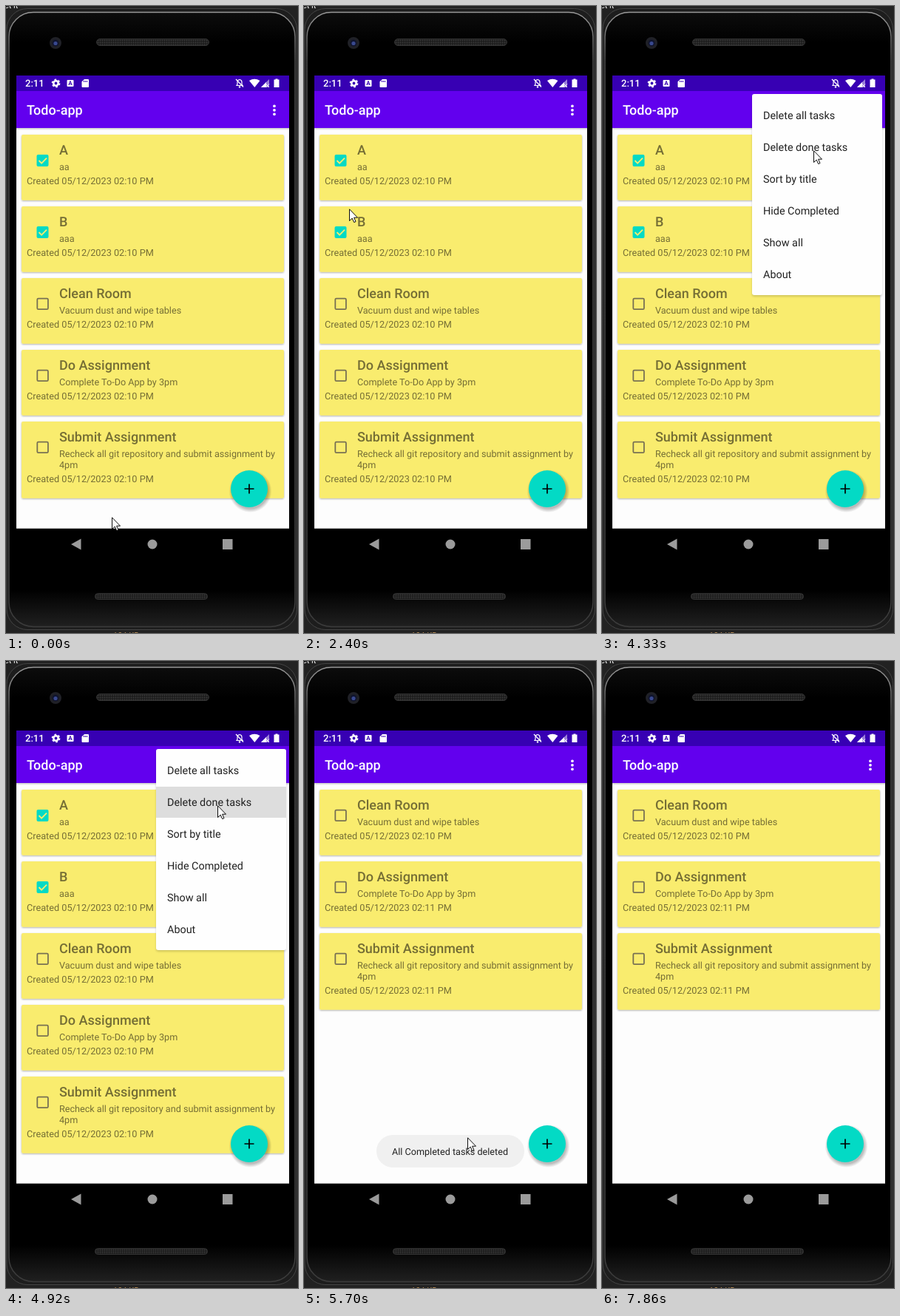
An HTML page that plays this animation: 395 by 848 pixels, repeating every 8.01 s.

```html
<!DOCTYPE html>
<html lang="en">
<head>
<meta charset="utf-8">
<title>Todo app demo</title>
<style>
html, body { margin: 0; width: 100%; height: 100%; overflow: hidden; background: #222; }
svg { display: block; width: 395px; height: 848px; font-family: Roboto, Arial, sans-serif; text-rendering: geometricPrecision; }
.title { font-size: 18px; font-weight: 500; }
.body { font-size: 12.63px; }
.stamp { font-size: 12.7px; }
.item { font-size: 14.4px; fill: #212121; }
</style>
</head>
<body>
<svg viewBox="0 0 395 848">
  <defs>
    <linearGradient id="rim" x1="0" y1="0" x2="0" y2="1">
      <stop offset="0" stop-color="#999"/><stop offset=".08" stop-color="#484848"/>
      <stop offset="1" stop-color="#3c3c3c"/>
    </linearGradient>
    <linearGradient id="glass" x1="0" y1="0" x2="0" y2="1">
      <stop offset="0" stop-color="#0c0c0c"/><stop offset=".05" stop-color="#000"/>
      <stop offset=".94" stop-color="#000"/><stop offset="1" stop-color="#202020"/>
    </linearGradient>
    <linearGradient id="barShade" x1="0" y1="0" x2="0" y2="1">
      <stop offset="0" stop-color="#c8c8c8"/><stop offset="1" stop-color="#fdfdfd"/>
    </linearGradient>
    <radialGradient id="fabShade">
      <stop offset=".82" stop-color="#000" stop-opacity=".26"/><stop offset="1" stop-color="#000" stop-opacity="0"/>
    </radialGradient>
    <pattern id="mesh" width="3" height="3" patternUnits="userSpaceOnUse">
      <rect width="3" height="3" fill="#1b1b1b"/><circle cx="1.5" cy="1.5" r="1" fill="#3a3a3a"/>
    </pattern>
    <clipPath id="menuClip"><rect id="menuClipBox"/></clipPath>
    <filter id="cardShade" x="-5%" y="-10%" width="110%" height="125%">
      <feDropShadow dx="0" dy="1" stdDeviation=".9" flood-opacity=".32"/>
    </filter>
    <filter id="blur" x="-10%" y="-10%" width="120%" height="120%"><feGaussianBlur stdDeviation="1.8"/></filter>
  </defs>

  <!-- Phone body -->
  <rect width="395" height="848" fill="#222"/>
  <text x="-2" y="3" font-size="11" fill="#eee">ct it</text>
  <rect x="1" y="3.5" width="392.5" height="840" rx="28" fill="#1d1d1d" stroke="#444"/>
  <rect x="4" y="8.5" width="387" height="831" rx="33" fill="url(#glass)" stroke="url(#rim)" stroke-width="1.5"/>
  <text x="145" y="855" font-size="11" fill="#c99a5b">104 KB</text>
  <g fill="url(#mesh)" stroke="#333">
    <rect x="122.5" y="44.5" width="152" height="9" rx="4.5"/>
    <rect x="120.5" y="794.5" width="152" height="8" rx="4"/>
  </g>
  <circle cx="67" cy="50" r="8" fill="#202127"/>
  <circle cx="67" cy="50" r="4.5" fill="#10142e"/>
  <circle cx="67" cy="50.5" r="2.6" fill="#39498f"/>

  <!-- Screen -->
  <rect x="14" y="94" width="369" height="612.7" fill="#fdfdfd"/>
  <rect x="14" y="94" width="369" height="21" fill="#3700b3"/>
  <rect x="14" y="115" width="369" height="50" fill="#6200ee"/>
  <rect x="14" y="165" width="369" height="3" fill="url(#barShade)"/>
  <g fill="#fff">
    <text x="26" y="109" font-size="13" font-weight="500">2:11</text>
    <circle cx="67.5" cy="104.5" r="3.2" fill="none" stroke="#fff" stroke-width="2.6"/>
    <circle cx="67.5" cy="104.5" r="5" fill="none" stroke="#fff" stroke-width="1.8" stroke-dasharray="2.6 2.636"/>
    <rect x="82.5" y="100" width="9" height="9" rx="1"/>
    <text x="87" y="107.4" font-size="8" font-weight="700" text-anchor="middle" fill="#3700b3">A</text>
    <path d="M106 99H111Q112 99 112 100V109Q112 110 111 110H103.5Q102.5 110 102.5 109V102.5Z"/>
    <path d="M105.5 101V103M107.5 101V103M109.5 101V103" stroke="#3700b3"/>
    <path d="M312 107.5H320L319 106V103Q319 100 316 99.5Q313 100 313 103V106Z" fill="none" stroke="#fff" stroke-width="1.2"/>
    <path d="M311 99L321 109.5" stroke="#fff" stroke-width="1.3"/>
    <circle cx="316" cy="109.5" r="1.2"/>
    <path d="M329 101Q336 96.5 343.5 101L336.3 110Z"/>
    <path d="M356 99V110H345Z" opacity=".5"/>
    <path d="M352 103V110H345Z"/>
    <path d="M351.5 105.5L356 110M356 105.5L351.5 110" stroke="#fff"/>
    <path d="M364.5 98.5H367.5V99.5H369.5V110H362.5V99.5H364.5Z"/>
    <text x="28" y="147.2" class="title">Todo-app</text>
    <path d="M363 135.3h0M363 140.8h0M363 146.3h0" stroke="#fff" stroke-width="3.8" stroke-linecap="round"/>
    <circle id="ripple" cx="362" cy="141.5" fill-opacity=".16"/>
  </g>
  <g id="before"></g>
  <g id="after"></g>

  <circle cx="330.5" cy="656" r="29" fill="url(#fabShade)"/>
  <circle cx="329" cy="653" r="25" fill="#03dac5"/>
  <path d="M322.5 653H335.5M329 646.5V659.5" stroke="#000" stroke-width="1.7"/>

  <g fill="#9b9b9b">
    <path d="M88 728L101.5 720.5V735.5Z"/>
    <circle cx="198" cy="728" r="6.5"/>
    <rect x="293" y="721" width="13.5" height="14"/>
  </g>

  <g id="toast">
    <rect x="98" y="641" width="200" height="44" rx="22" fill="#f0f0f0"/>
    <text x="119" y="668" class="body" fill="#222">All Completed tasks deleted</text>
  </g>
  <g id="menu">
    <rect id="menuShade" rx="3" opacity=".16" filter="url(#blur)"/>
    <g id="menuWindow" clip-path="url(#menuClip)">
      <g id="menuBody">
        <rect x="203" y="119" width="176" height="272" rx="3" fill="#fefefe"/>
        <rect id="press" x="203" y="170" width="176" height="42" opacity=".13"/>
      </g>
    </g>
  </g>
  <path id="cursor" d="M.5 .8V16.5L4.2 13.1L6.7 18.6L9 17.6L6.6 12.2H11.5Z" fill="#fff" stroke="#000" stroke-width=".95"/>
</svg>
<script>
const LOOP = 8010;
const FRAME = 120;
const OPEN = 3310, PRESS = 4920, DELETE = 5040;
const $ = id => document.getElementById(id);

const text = (x, y, cls, str) => `<text x="${x}" y="${y}" class="${cls}">${str}</text>`;

function checkbox(y, done) {
  return done
    ? `<rect x="41.5" y="${y + 27}" width="16" height="16" rx="2" fill="#03dac5"/>
       <path d="M44.5 ${y + 35}l3.6 3.6l6.9-7" fill="none" stroke="#f9ec6e" stroke-width="1.8"/>`
    : `<rect x="42.3" y="${y + 27.6}" width="14.6" height="14.6" rx="1.5" fill="none" stroke="#787153" stroke-width="1.8"/>`;
}

function card(y, task) {
  const extra = (task.lines.length - 1) * 15;
  const lines = task.lines.map((s, i) => text(72, y + 48 + i * 14.5, 'body', s)).join('');
  return `<rect x="21" y="${y}" width="355" height="${88.7 + extra}" rx="2" fill="#f9ec6e" filter="url(#cardShade)"/>
    ${checkbox(y, task.done)}
    <g fill="#756e35">${text(72, y + 27, 'title', task.name)}${lines}
    ${text(28, y + 67.3 + extra, 'stamp', `Created 05/12/2023 02:${task.min} PM`)}</g>`;
}

const task = (name, lines, min = 10, done = false) => ({ name, lines: lines.split('|'), min, done });
const todo = min => [
  task('Clean Room', 'Vacuum dust and wipe tables'),
  task('Do Assignment', 'Complete To-Do App by 3pm', min),
  task('Submit Assignment', 'Recheck all git repository and submit assignment by|4pm', min)
];
const list = tasks => tasks.map((t, i) => card(174 + 97 * i, t)).join('');

$('before').innerHTML = list([task('A', 'aa', 10, true), task('B', 'aaa', 10, true), ...todo(10)]);
$('after').innerHTML = list(todo(11));
$('menuBody').innerHTML += ['Delete all tasks', 'Delete done tasks', 'Sort by title', 'Hide Completed', 'Show all', 'About']
  .map((s, i) => text(218, 153 + 43 * i, 'item', s)).join('');

const ramp = (t, from, to) => Math.min(1, Math.max(0, (t - from) / (to - from)));
const snap = (t, from) => from + Math.floor((t - from) / FRAME) * FRAME;
const set = (id, attrs) => {
  for (const k in attrs) $(id).setAttribute(k, attrs[k]);
};
const show = (id, on) => set(id, { visibility: on ? 'visible' : 'hidden' });

// Places the pointer visits: time, x, y.
const stops = [
  [475, 143, 691], [740, 197, 396], [890, 58, 284], [1160, 26, 226], [1430, 46, 211],
  [1700, 22, 206], [2020, 62, 262], [2400, 61, 274], [2640, 383, 190], [2880, 354, 146],
  [3445, 354, 146], [3940, 306, 199], [4330, 286, 195], [5280, 286, 195], [5700, 221, 644],
  [5970, 119, 654], [6120, 302, 645], [6240, 118, 629], [6540, 197, 624], [7225, 197, 624],
  [7600, 347, 760], [7860, 400, 870]
];

function pointer(t) {
  const i = Math.max(1, stops.findIndex(s => s[0] > t));
  if (t >= stops.at(-1)[0]) return stops.at(-1).slice(1);
  const [t0, x0, y0] = stops[i - 1], [t1, x1, y1] = stops[i];
  const n = Math.round((t1 - t0) / (FRAME + 15));
  const p = Math.floor(ramp(t, t0, t1) * n) / n;
  return [x0 + (x1 - x0) * p, y0 + (y1 - y0) * p];
}

function drawMenu(t) {
  const opening = snap(t, OPEN);
  const fading = snap(t, PRESS);
  const grow = 1 - (1 - ramp(opening, 3190, 3550)) ** 1.6;
  const alpha = ramp(opening, 3190, 3328) * (1 - ramp(fading, PRESS, 5127));
  const width = 176 * (0.48 + 0.52 * grow);
  const height = 272 * grow;
  const right = 379 + 4 * (1 - grow);
  const box = { x: right - width, y: 119, width, height };

  show('menu', t >= OPEN && alpha > 0);
  set('menuWindow', { opacity: alpha });
  set('menuClipBox', box);
  set('menuShade', { ...box, y: 121 });
  // The content stays centred in the growing window.
  set('menuBody', { transform: `translate(${right - width / 2 - 291} ${height / 2 - 136})` });
  set('press', { visibility: t >= PRESS ? 'inherit' : 'hidden' });
}

function draw(t) {
  set('cursor', { transform: `translate(${pointer(t)})` });
  show('before', t < DELETE);
  show('after', t >= DELETE);
  show('ripple', t >= 3160 && t < 3580);
  set('ripple', { r: 15 + 3 * ramp(t, 3160, OPEN) });
  drawMenu(t);

  const toast = snap(t, DELETE - FRAME * 2);
  set('toast', { opacity: ramp(toast, 4980, 5400) * (1 - ramp(snap(t, 6970), 6850, 7330)) });
}

const start = performance.now();
function tick() {
  draw((performance.now() - start) % LOOP);
  requestAnimationFrame(tick);
}
tick();
</script>
</body>
</html>
```
